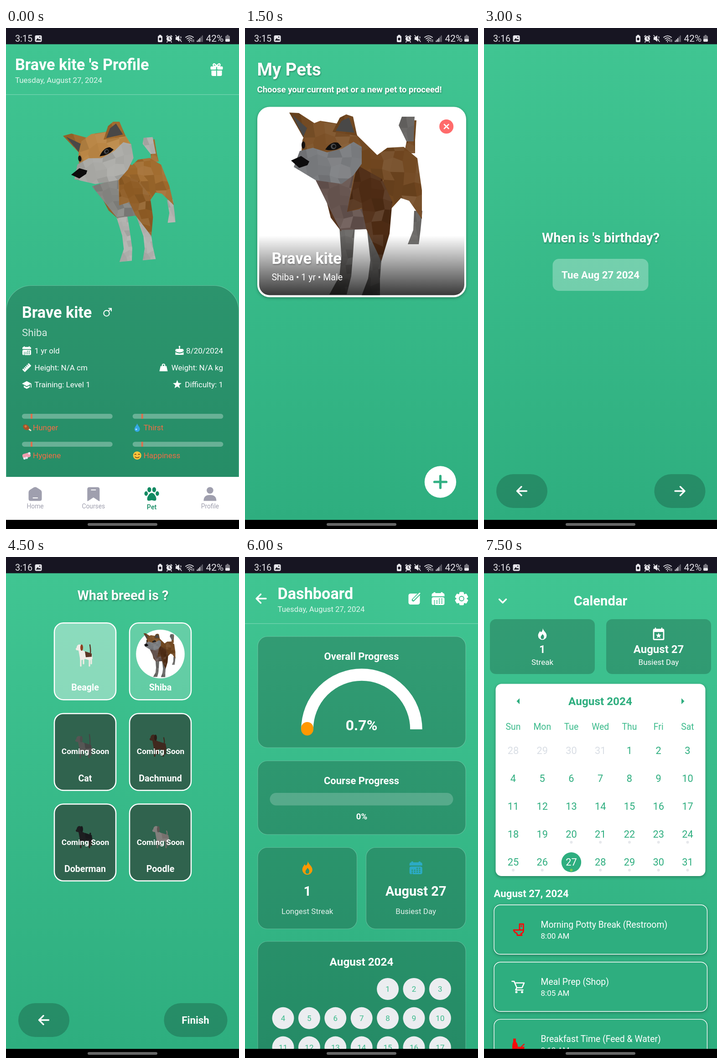
These frames come from a looping animation (511x1096 px, 8000 ms). An HTML page:

```html
<!DOCTYPE html>
<html lang="en">
<head>
<meta charset="utf-8">
<title>Pet care app</title>
<style>
html, body { margin: 0; width: 100%; height: 100%; overflow: hidden; background: #000; }
svg { display: block; width: 100vw; height: 100vh; }
text { font-family: Roboto, Arial, sans-serif; white-space: pre; }
.glow { filter: drop-shadow(1.5px 2px 1.5px rgba(0,0,0,.28)); }
.card { filter: drop-shadow(0 2px 3px rgba(0,0,0,.3)); }
</style>
</head>
<body>
<svg id="stage" viewBox="0 0 511 1096" xmlns="http://www.w3.org/2000/svg"></svg>
<script>
const PET = 'Brave kite';
const GREEN = '#2eae7f', MINT = '#3cbb8c', DARK = '#29916b', GRAY = '#9f9fae', CORAL = '#f56c45', ORANGE = '#ff9800';
const SHADE = 'rgba(0,0,0,.2)', VEIL = 'rgba(255,255,255,.3)';
const TITLE = 34.2, BODY = 17;
const HOLD = 1500, LOOP = 8000;

// Drawing helpers
const range = n => [...Array(n).keys()];
const each = (list, fn) => list.map(fn).join('');
const txt = (x, y, size, str, o = {}) =>
  `<text x="${x}" y="${y}" font-size="${size}" font-weight="${o.w || 400}" fill="${o.c || '#fff'}" ` +
  `text-anchor="${o.a || 'start'}" opacity="${o.o || 1}"${o.glow ? ' class="glow"' : ''}>${str}</text>`;
const mid = (x, y, size, str, o = {}) => txt(x, y, size, str, { a: 'middle', ...o });
const bold = (x, y, size, str, o = {}) => mid(x, y, size, str, { w: 700, ...o });
const box = (x, y, w, h, r, fill, extra = '') =>
  `<rect x="${x}" y="${y}" width="${w}" height="${h}" rx="${r}" fill="${fill}" ${extra}/>`;
const dot = (x, y, r, fill = '#fff', extra = '') => `<circle cx="${x}" cy="${y}" r="${r}" fill="${fill}" ${extra}/>`;
const oval = (x, y, rx, ry, fill) => `<ellipse cx="${x}" cy="${y}" rx="${rx}" ry="${ry}" fill="${fill}"/>`;
const path = (d, fill = '#fff') => `<path d="${d}" fill="${fill}"/>`;
const line = (d, width, color = '#fff', cap = 'round') =>
  `<path d="${d}" fill="none" stroke="${color}" stroke-width="${width}" stroke-linecap="${cap}" stroke-linejoin="round"/>`;
const poly = (fill, pts) => `<polygon points="${pts}" fill="${fill}"/>`;
const at = (x, y, s, body, turn = 0) =>
  `<g transform="translate(${x} ${y}) scale(${s}) rotate(${turn})">${body}</g>`;

// Polygon covered with irregular, softly shaded patches
const noise = (i, j, k) => {
  const v = Math.sin(i * 127.1 + j * 311.7 + k * 74.7) * 43758.5453;
  return v - Math.floor(v);
};
let clips = 0;
function facets(color, pts, cell = 24, depth = .2) {
  const n = pts.split(/[ ,]+/).map(Number), id = 'clip' + clips++;
  const xs = n.filter((_, i) => i % 2 === 0), ys = n.filter((_, i) => i % 2);
  const x0 = Math.min(...xs) - cell, y0 = Math.min(...ys) - cell;
  const cols = Math.ceil((Math.max(...xs) - x0) / cell) + 1;
  const rows = Math.ceil((Math.max(...ys) - y0) / cell) + 1;
  const node = (i, j) => [x0 + (i + noise(i, j, 1) * .6) * cell, y0 + (j + noise(i, j, 2) * .6) * cell]
    .map(v => v.toFixed(1)).join();
  const patch = (i, j) => {
    const shade = noise(i, j, 3) - .5;
    const corners = [node(i, j), node(i + 1, j), node(i + 1, j + 1), node(i, j + 1)].join(' ');
    return `<polygon points="${corners}" fill="${shade < 0 ? '#000' : '#fff'}" opacity="${(Math.abs(shade) * depth).toFixed(2)}"/>`;
  };
  return `<clipPath id="${id}"><polygon points="${pts}"/></clipPath>` + poly(color, pts) +
    `<g clip-path="url(#${id})">${each(range(rows), j => each(range(cols), i => patch(i, j)))}</g>`;
}

// Limb: a spine of [x, y, width] joints
function limb(color, ...joints) {
  const side = s => joints.map(([x, y, w]) => `${x + s * w / 2},${y}`);
  return facets(color, [...side(-1), ...side(1).reverse()].join(' '), 16);
}

// One dog; head and torso each take their own viewing matrix
const NEAR = { fur: '#70461f', deep: '#4f2c14', chest: '#66544f', leg: '#686664', face: '#7d5228', muzzle: '#787a7d' };
const SUNNY = { fur: '#a06a2c', deep: '#8f5c24', chest: '#858581', leg: '#b0b0ad', face: '#b98543', muzzle: '#a9a9a5' };
function dog(c, torso = '', head = '') {
  const ear = (outer, inner) => facets(c.fur, outer) + poly('#494847', inner);
  return `<g transform="${torso}">` +
    limb(c.fur, [369, 202, 14], [364, 245, 18], [361, 274, 24]) + limb(c.leg, [358, 194, 28], [354, 213, 34], [362, 248, 16]) +
    limb(c.leg, [380, 400, 18], [377, 442, 16], [369, 473, 24]) +
    limb(c.leg, [224, 436, 34], [224, 500, 25], [220, 543, 26], [204, 583, 38]) +
    limb(c.leg, [283, 445, 30], [287, 508, 24], [283, 548, 26], [276, 585, 40]) +
    facets(c.deep, '172,352 211,400 211,445 188,415') +
    facets(c.fur, '246,235 290,278 312,262 348,260 378,285 388,355 388,418 360,378 342,372 320,396 266,440 222,402') +
    facets(c.chest, '155,333 240,315 224,402 262,394 268,440 209,442') +
    facets(c.deep, '246,300 300,330 323,380 317,450 299,510 266,440 256,393 224,402') + '</g>' +
    `<g transform="${head}">` +
    ear('97,185 118,186 152,208 128,240', '104,190 136,219 128,238') +
    facets(c.face, '124,268 126,245 139,213 165,203 208,210 245,232 256,262 250,300 130,290') +
    ear('192,227 208,196 222,189 237,194 246,236', '199,225 212,203 228,196 240,229') +
    facets(c.muzzle, '120,269 149,262 180,272 213,264 238,249 256,260 256,297 238,322 212,341 155,333 107,304') +
    poly('#0d0c0d', '101,290 123,280 141,292 137,300 119,306') +
    path('M176 266Q188 247 204 251L212 260Q196 271 176 266Z', '#100e0d') + dot(194, 259, 6, '#4a4b4e') + dot(195, 259, 3.5, '#111') +
    oval(128, 256, 4, 8, '#17120f') + '</g>';
}

// Tiny pet facing left, about 36 by 50
const pup = (x, y, coat, back, legs, ear, tail = -22) => at(x, y, 1,
  line(`M13-3Q14-10 12 ${tail}`, 2.4, back) + each([-8, -2, 11, 15], (lx, k) => line(`M${lx} 4V${k % 2 ? 19 : 24}`, 3.2, legs)) +
  poly(coat, '-13,-10 -4,-10 4,-6 16,-3 18,8 12,12 2,9 -9,12') + poly(back, '1,-8 16,-3 16,4 3,5') +
  oval(-11, -16, 6, 7, coat) + oval(-15, -13, 4, 3, coat) + oval(-6, -16, 3, 7, ear));

// Icons centred on 0,0
const flame = hole => path('M1-15C2-8 11-4 11 4A11 11 0 0 1-11 4C-11-2-7-5-6-8C-5-6-4-5-3-5C0-7 1-11 1-15Z', 'currentColor') +
  path('M0 0C4 3 5 6 4 9A4 4 0 0 1-4 9C-5 5-1 4 0 0Z', hole);
const calendar = (fill, hole) => box(-10, -14, 4, 6, 1, fill) + box(6, -14, 4, 6, 1, fill) +
  path('M-14-5V-8Q-14-12-10-12H10Q14-12 14-8V-5Z', fill) + box(-14, -3, 28, 17, 4, fill) +
  each(range(11), k => dot(-8 + ((k + 2) % 4) * 5.4, 1 + Math.floor((k + 2) / 4) * 4.2, 1.5, hole));
const star = poly('#fff', range(10).map(k => {
  const r = k % 2 ? 4.3 : 10, a = k * Math.PI / 5;
  return `${(r * Math.sin(a)).toFixed(2)},${(-r * Math.cos(a)).toFixed(2)}`;
}).join(' '));
const arrow = line('M10.5 0H-10M-1-9.5-10.5 0-1 9.5', 3.3);
const gear = each(range(6), k => `<g transform="rotate(${k * 60})">${box(-5, -14.5, 10, 9, 2.5, '#fff')}</g>`) +
  dot(0, 0, 11.5) + dot(0, 0, 5, '#fff', `stroke="${MINT}" stroke-width="1.8"`);
const gift = each([-1, 1], s => `<g transform="scale(${s} 1)">` + box(1, -7, 12.5, 7, 2, '#fff') +
  path('M1 2H11.5V11Q11.5 14 8 14H1Z') + line('M0-7C3-14 8-14 7.5-9.5Q7-7 0-7', 2.6) + '</g>');
const ruler = box(-10, -4, 20, 8, 1, '#fff') + each(range(4), k => line(`M${k * 4 - 6}-4V-1`, 1.3, DARK));
const cap = path('M-10.5-2 0-7.5 10.5-2 0 3.5Z') + path('M-6.5 2 0 5.5 6.5 2V6L0 9.5-6.5 6Z') + line('M9.5-1V6', 1.6);
const cake = path('M-9 9V3Q0 9 9 3V9Z') + path('M-9 1V-1Q-9-4-6-4H6Q9-4 9-1V1Q0 7-9 1Z') + line('M0-4V-8', 2) + dot(0, -9, 1.8);
const weight = path('M-6.500-3.500H6.500L9 8H-9Z'.replace(/00/g, '')) + dot(0, -5, 2.8, 'none', 'stroke="#fff" stroke-width="2"');
const drumstick = line('M4 0H11', 3, '#eee0ca') + oval(-1, 0, 7.5, 5.5, '#a65328') + dot(-3, -1, 2.5, '#cf7a42');
const drop = path('M0-9C1.500-4 6-1 6 3.500A6 6 0 0 1-6 3.500C-6-1-1.500-4 0-9Z', '#35a8e5') + dot(-2, 4, 1.8, '#b5e6ff');
const soap = box(-9, -5, 18, 10, 4, '#ee9cad') + each([-6, -1, 7], (x, k) => dot(x, k > 1 ? -3 : 5, 2.6, '#dfeaf1'));
const smile = dot(0, 0, 9, '#fcc43c') + line('M-5.500-2Q-4-4-2.500-2M2.500-2Q4-4 5.500-2M-4.500 3Q0 7 4.500 3', 1.4, '#713c18');
const home = path('M-14.500-4Q-14.500-8-11-10L-3-15Q0-16.500 3-15L11-10Q14.500-8 14.500-4V10Q14.500 14.500 10 14.500H-10Q-14.500 14.500-14.500 10Z', GRAY) + line('M-4.500 8H5', 2.2);
const bookmark = path('M-13.500-11Q-13.500-15.500-9-15.500H9Q13.500-15.500 13.500-11V14Q13.500 16 11.500 14.500L0 7-11.500 14.500Q-13.500 16-13.500 14Z', GRAY) + line('M-4.500-9.500H4.500', 2.2);
const paw = each([-1, 1], s => oval(s * 5.3, -10, 4.2, 5.5, 'currentColor') + oval(s * 12.3, -1.5, 3.8, 5, 'currentColor')) +
  path('M0-3C5-3 10 5 10 10C10 16 5 14 0 13C-5 14-10 16-10 10C-10 5-5-3 0-3Z', 'currentColor');
const person = dot(0, -8.5, 7.3, GRAY) + path('M-14 14.500Q-14 1.500 0 1.500T14 14.500Z', GRAY);

// Shared parts
const sky = box(0, 35, 511, 1041, 0, 'url(#sky)');
const rule = box(0, 145, 511, 1.2, 0, VEIL);
const panel = (x, y, w, h, r = 21) => box(x, y, w, h, r, SHADE, 'stroke="#fff" stroke-opacity=".22" stroke-width="1.2"');
const pill = (x, w) => box(x, 976, w, 74, 37, SHADE);
const backPill = pill(27, 112) + at(83, 1013, 1, arrow);
const header = (x, title) => txt(x, 92, TITLE, title, { w: 700 }) +
  txt(x, 120, 16.85, 'Tuesday, August 27, 2024', { o: .85 }) + rule;
const homeBar = box(0, 1076, 511, 20, 0, '#000') + box(179, 1083, 153, 6, 3, '#666');

function statusBar() {
  const c = '#e6e5ea', bg = '#171522';
  const photo = box(-7.5, -7, 15, 14.5, 3, c) + path('M-5.5 4.5-1.5-1 1.5 2.5 3.5.5 6 4.5Z', bg) + dot(3, -3, 1.3, bg);
  const saver = box(-5, -6, 10, 14, 2, c) + box(-2.5, -8, 5, 3, 1, c) + oval(0, 1, 2.6, 3, bg);
  const alarm = dot(0, .5, 6, c) + line('M-6-4.5-3.5-6.5M6-4.5 3.5-6.5M-4 6.500-5 8M4 6.500 5 8', 1.8, c) + line('M0-3V1L2.500 2', 1.3, bg);
  const mute = path('M-7-3H-4L1-7V7L-4 3H-7Z', c) + line('M-7-7 6 7M4-4Q6-2.500 4-1M4 2V3', 1.5, c);
  const wifi = each(range(3), k => {
    const w = 8.5 - k * 2.8, y = k * 3.3 - 2.5;
    return line(`M${-w} ${y}Q0 ${y - w * .8} ${w} ${y}`, 1.7, c);
  }) + dot(0, 7, 1.3, c) + line('M5.500 7V3M9 2.500V7', 1.3, c);
  const signal = each(range(5), k => box(k * 2.8 - 6.500, 4.5 - k * 2.8, 1.9, 3 + k * 2.8, .4, c, k > 2 ? 'opacity=".45"' : ''));
  const cell = box(-5, -6, 10, 13, 2, '#77757e') + box(-2, -8, 4, 3, 1, '#77757e') + box(-5, 1, 10, 6, 2, c);
  return box(0, 0, 511, 35.5, 0, bg) + `<g id="clock">${txt(20, 29.5, 19.8, '3:15', { c })}</g>` + txt(438.5, 29.5, 20.8, '42%', { c }) +
    each([[71, photo], [338, saver], [358, alarm], [379, mute], [402.5, wifi], [425, signal], [486, cell]], ([x, icon]) => at(x, 23, 1, icon));
}

function profile() {
  const facts = [
    [calendar('#fff', DARK), .68, 0, '1 yr old', cake, 380.5, '8/20/2024'],
    [ruler, 1, -45, 'Height: N/A cm', weight, 345.5, 'Weight: N/A kg'],
    [cap, 1, 0, 'Training: Level 1', star, 375.5, 'Difficulty: 1']
  ];
  const fact = ([icon, s, turn, left, icon2, x2, right], k) => {
    const y = 706 + k * 37;
    return at(45.5, y, s, icon, turn) + txt(62.5, y + 6, BODY, left) +
      at(x2, y, 1, icon2) + txt(476, y + 6, BODY, right, { a: 'end' });
  };
  const needs = [[drumstick, 'Hunger', 35], [drop, 'Thirst', 0], [soap, 'Hygiene', -15], [smile, 'Happiness', 0]];
  const need = ([icon, label, turn], k) => {
    const x = 35 + (k % 2) * 242.7, y = 844 + Math.floor(k / 2) * 61.2;
    return box(x, y, 198.7, 10.7, 5.3, VEIL) + box(x + 19, y, 4, 10.7, 0, '#db704e') +
      at(x + 10, y + 30, 1, icon, turn) + txt(x + 24, y + 36, BODY, label, { c: CORAL });
  };
  const tabs = [[home, 'Home'], [bookmark, 'Courses'], [paw, 'Pet'], [person, 'Profile']];
  const tab = ([icon, label], k) => {
    const x = 64 + k * 127.8, on = icon === paw, c = on ? '#128a62' : GRAY;
    return `<g color="${c}">${at(x, 1020, 1, icon)}</g>` + mid(x, on ? 1053 : 1050.5, on ? 14.3 : 13.8, label, { c, w: on ? 500 : 400 });
  };
  return sky + header(20, `${PET} 's Profile`) + at(462, 91, 1, gift) +
    dog(SUNNY, 'matrix(.714 -.068 .156 .67 25.8 133.7)', 'matrix(.876 -.274 .137 .821 14.7 110.6)') +
    panel(.6, 563.5, 509.8, 500, 55) + txt(35, 634, TITLE, PET, { w: 700 }) +
    dot(220.5, 624, 6.2, 'none', 'stroke="#fff" stroke-width="2"') + line('M225 619 231 613.5M225.5 613.5H231V619', 2) +
    txt(35, 674, 22.3, 'Shiba', { o: .8 }) + each(facts, fact) + each(needs, need) +
    box(0, 982, 511, 94, 0, '#fff') + each(tabs, tab);
}

function myPets() {
  return sky + txt(26.5, 104, 38.3, 'My Pets', { w: 700, glow: 1 }) +
    txt(26.5, 140.5, 18.55, 'Choose your current pet or a new pet to proceed!', { w: 700, glow: 1 }) +
    box(27, 172.5, 458, 416.5, 27, '#fff', 'class="card"') +
    `<clipPath id="photo">${box(31, 176.5, 450, 408, 23, '#fff')}</clipPath><g clip-path="url(#photo)">${dog(NEAR)}` +
    box(31, 454, 450, 131, 0, 'url(#fade)') + '</g>' +
    txt(58.5, 515.5, TITLE, PET, { w: 700, glow: 1 }) + txt(58.5, 552, 19.5, 'Shiba • 1 yr • Male') +
    dot(441.7, 215.5, 15.5, '#ff6b6b') + line('M437 211 446.5 220M446.5 211 437 220', 2.6) +
    dot(428.5, 993, 34.7) + line('M415.5 993H441.5M428.5 980V1006', 5.2, '#32b083');
}

function birthday() {
  return sky + bold(256, 469, 29, "When is 's birthday?", { glow: 1 }) +
    box(150.5, 505, 210, 70, 14, VEIL) + bold(255.5, 548, 22.3, 'Tue Aug 27 2024') +
    backPill + pill(373.5, 112) + at(429.5, 1013, 1, arrow, 180);
}

function breeds() {
  const shiba = dot(68.5, 69.1, 53.3) + at(8.3, -20.9, .24, dog(NEAR));
  const pets = [
    ['Beagle', pup(67, 71, '#f0ece7', '#5a3524', '#f0ebe4', '#8e4222')],
    ['Shiba', shiba],
    ['Cat', pup(66, 73, '#555654', '#444544', '#4c4d4c', '#4c4d4c', -26)],
    ['Dachmund', pup(64, 70, '#40291e', '#3f291f', '#3f291f', '#2c1d17', -16)],
    ['Doberman', pup(67, 72, '#1d1e20', '#18191c', '#2e2420', '#18191c', -6)],
    ['Poodle', pup(70, 72, '#827f7c', '#77716e', '#686662', '#5d5552', -12)]
  ];
  const tile = ([name, art], k) => {
    const locked = k > 1, frame = 'stroke="#fff" stroke-width="2.5"';
    const fill = locked ? '#30634e' : `rgba(255,255,255,${k ? .2 : .4})`;
    return at(105 + (k % 2) * 165, 143.2 + Math.floor(k / 2) * 198.2, 1,
      box(1, 1, 135, 168, 20, fill, frame) + art + bold(68.5, 149.3, 19.6, name) +
      (locked ? bold(69, 90, 17.3, 'Coming Soon') : ''));
  };
  return sky + bold(256.5, 94, 29, 'What breed is ?', { glow: 1 }) + each(pets, tile) +
    backPill + pill(346.5, 139) + bold(415.5, 1021, 22.3, 'Finish');
}

function dashboard() {
  const day = n => {
    const k = n + 3, x = 83.5 + (k % 7) * 57.4, y = 945 + Math.floor(k / 7) * 63.8;
    return dot(x, y, 24, '#ebedf0') + mid(x, y + 6.2, BODY, n, { c: MINT });
  };
  const stat = (x, w, icon, value, label) => panel(x, 635.5, w, 178) + at(x + w / 2, 680, 1, icon) +
    bold(x + w / 2, 740.5, 29, value) + mid(x + w / 2, 781, BODY, label, { o: .87 });
  return sky + at(35.5, 91, 1, arrow) + header(71.5, 'Dashboard') +
    box(358.5, 80, 25, 24, 4.5, '#fff') + line('M369 94 383.5 79', 6.5, '#3ec290') + line('M369.5 93 383 79.5', 3) +
    at(423.5, 91, 1, calendar('#fff', '#3ec290')) + at(475, 91, 1, gear) +
    panel(28, 174, 456, 243) + bold(255.5, 224.5, 22, 'Overall Progress') +
    line('M136.5 377A119.5 119.5 0 0 1 375.5 377', 26.5, '#fff', 'butt') + line('M136.5 377V374.5', 26.8, ORANGE) +
    bold(255.5, 379, 32, '0.7%') +
    panel(28, 446, 456, 161) + bold(255.5, 496.5, 22, 'Course Progress') +
    box(54.5, 516, 402, 27.5, 13.7, 'rgba(255,255,255,.2)') + bold(256, 574, 18.6, '0%') +
    stat(28, 217.5, `<g color="${ORANGE}">${flame('#2b966e')}</g>`, '1', 'Longest Streak') +
    stat(265.5, 218.5, calendar('#2caac4', '#2b966e'), 'August 27', 'Busiest Day') +
    panel(28, 841, 456, 300) + bold(255.5, 893.5, 24.3, 'August 2024') + each(range(17), k => day(k + 1));
}

function agenda() {
  const col = i => 64 + i * 63.75;
  const cell = k => {
    const n = k < 4 ? 28 + k : k - 3, x = col(k % 7), y = 423 + Math.floor(k / 7) * 61.2;
    const today = n === 27;
    return (today ? dot(x, y, 21.7, GREEN) : '') +
      mid(x, y + 7.5, 21.8, n, { c: today ? '#fff' : k < 4 ? '#d9dee5' : GREEN }) +
      (k > 22 ? dot(x, y + 17.3, 3, today ? '#79c957' : '#e6e8ec') : '');
  };
  const red = '#f50b0b';
  const toilet = line('M3 0V-12H11.5V3Q11.5 7 6 9L8 12.5H-2L-3 8Q-9 6-10 1H11M7-8V-7', 2.8, red);
  const cart = line('M-13.5-12H-9L-3 2H8.5L13-8.5H-7M-3 2-5.5 7H10.5', 2.6) + dot(-4, 11.5, 2.5) + dot(8.5, 11.5, 2.5);
  const meal = path('M-11-12H-5V-5Q-1-1-1 5V15H-13V5Q-13-1-11-5Z', red) + path('M-1 6H14Q13 14 9 15H0Z', red) + line('M7 6 13 .5', 2.2, red);
  const tasks = [
    ['Morning Potty Break (Restroom)', '8:00 AM', toilet],
    ['Meal Prep (Shop)', '8:05 AM', cart],
    ['Breakfast Time (Feed &amp; Water)', '8:10 AM', meal]
  ];
  const task = ([title, time, icon], k) => at(0, 761 + k * 125.2, 1,
    box(22, 0, 467.5, 108, 14, GREEN, 'stroke="#fff" stroke-width="1.4" class="card"') +
    at(75, 54, 1, icon) + txt(124.5, 50, 19.4, title) + txt(124.5, 74, BODY, time));
  const badge = (x, icon, value, label) => box(x, 136, 230, 120, 13, SHADE) + at(x + 115, 168.5, 1, icon) +
    bold(x + 115, 210, 24, value) + mid(x + 115, 236, BODY, label);
  const dayBox = line('M-11-8V10.5Q-11 12 -9.5 12H9.500Q11 12 11 10.500V-8Z', 2.8) + box(-12, -11.5, 24, 7, 2, '#fff') +
    line('M-7-13V-10M7-13V-10', 2.5) + at(0, 3.5, .65, star);
  const days = ['Sun', 'Mon', 'Tue', 'Wed', 'Thu', 'Fri', 'Sat'];
  return sky + line('M33.5 92.5 41 100 48.5 92.5', 3.3) + bold(255.5, 106, 29.2, 'Calendar') +
    badge(13, `<g color="#fff">${at(0, 0, .85, flame('#309a73'))}</g>`, '1', 'Streak') +
    badge(268, dayBox, 'August 27', 'Busiest Day') +
    box(25.5, 277.5, 460, 420.5, 13, '#fff', 'class="card"') +
    path('M71.5 315.5 78 309V322Z', GREEN) + path('M439.5 315.5 433 309V322Z', GREEN) +
    bold(255, 324, 24.3, 'August 2024', { c: GREEN }) +
    each(days, (d, i) => mid(col(i), 378, 19.4, d, { c: MINT })) + each(range(35), cell) +
    txt(21.5, 743.5, 22.2, 'August 27, 2024', { w: 700 }) + each(tasks, task);
}

const screens = [profile, myPets, birthday, breeds, dashboard, agenda];
const gradient = (id, from, to) => `<linearGradient id="${id}" x2="0" y2="1"><stop ${from}/><stop offset="1" ${to}/></linearGradient>`;
const stage = document.getElementById('stage');
stage.innerHTML = '<defs>' + gradient('sky', 'stop-color="#40c592"', `stop-color="${GREEN}"`) +
  gradient('fade', 'stop-opacity="0"', 'stop-opacity=".78"') + '</defs>' +
  each(screens, draw => `<g class="screen">${draw()}</g>`) + statusBar() + homeBar;

const layers = [...stage.querySelectorAll('.screen')];
const clock = stage.querySelector('#clock text');
const start = performance.now();

function render(ms) {
  const now = Math.min(Math.floor(ms / HOLD), layers.length - 1);
  layers.forEach((layer, i) => layer.setAttribute('display', i === now ? 'inline' : 'none'));
  clock.textContent = now < 2 ? '3:15' : '3:16';
}
function tick() {
  render((performance.now() - start) % LOOP);
  requestAnimationFrame(tick);
}
tick();
</script>
</body>
</html>
```
